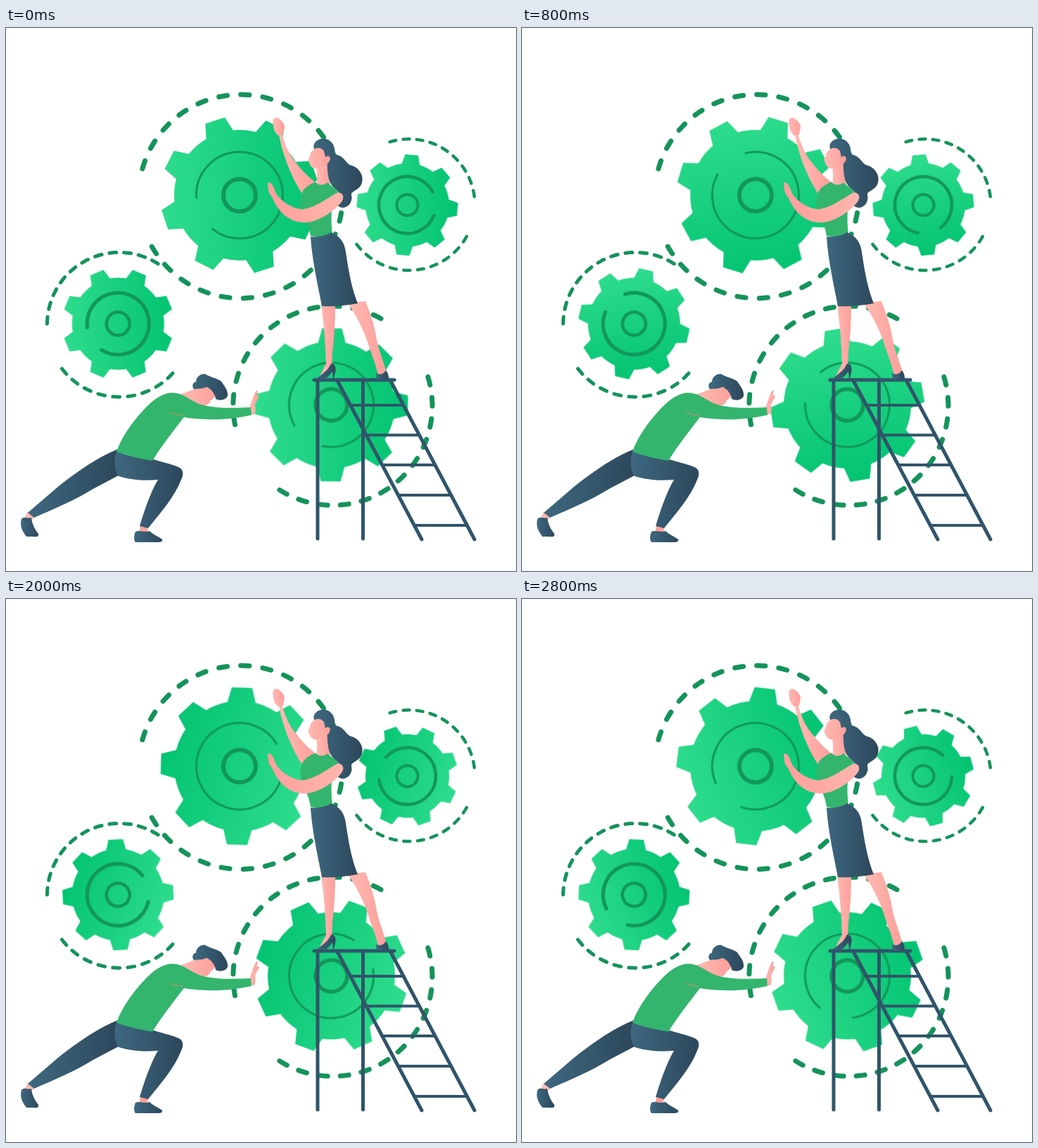
Recreate the animation shown at these times as an HTML page without scripts. Size 725 by 773 pixels, loop 3 s.

```html
<!DOCTYPE html>
<html lang="en">
<head>
<meta charset="utf-8">
<title>Turning gears</title>
<style>
html, body { margin: 0; width: 100%; height: 100%; overflow: hidden; background: #fff; }
svg { display: block; width: 100%; height: 100%; }

/* 20 degrees per tick, with one longer jump near the end */
.spin { animation: spin 3s infinite; }
@keyframes spin {
  0% { transform: rotate(0deg); animation-timing-function: steps(13); }
  86.666% { transform: rotate(260deg); animation-timing-function: step-end; }
  86.667% { transform: rotate(320deg); animation-timing-function: steps(2); }
  100% { transform: rotate(360deg); }
}

/* --a: tooth phase, --s: size */
.cog { transform: rotate(var(--a)) scale(var(--s)); clip-path: url(#cog); }
.cog circle { transform: rotate(calc(-1 * var(--a))); fill: url(#mint); }
.ring { fill: none; stroke: #12965a; stroke-linecap: round; }
.dash { fill: none; stroke: #14935a; stroke-linecap: round; }
.skin { fill: url(#skin); }
.shirt { fill: #33b56d; }
.navy { fill: url(#navy); }
.ladder { fill: none; stroke: #30546a; stroke-width: 5; stroke-linecap: round; }
</style>
</head>
<body>
<svg viewBox="0 0 725 773">
  <defs>
    <linearGradient id="mint" gradientUnits="userSpaceOnUse" x1="-115" y1="0" x2="115" y2="0">
      <stop offset="0" stop-color="#2ddc8c"/>
      <stop offset="1" stop-color="#04c472"/>
    </linearGradient>
    <linearGradient id="skin">
      <stop offset="0" stop-color="#ffbab2"/>
      <stop offset="1" stop-color="#fc9f9b"/>
    </linearGradient>
    <linearGradient id="forearm">
      <stop offset="0" stop-color="#fc9f9b"/>
      <stop offset="1" stop-color="#ffb5ae"/>
    </linearGradient>
    <linearGradient id="navy">
      <stop offset="0" stop-color="#3d687f"/>
      <stop offset="1" stop-color="#2d475b"/>
    </linearGradient>
    <path id="tooth" d="M-22-96L-15.6-120.2H15.6L22-96Z"/>
    <clipPath id="cog">
      <circle r="100"/>
      <use href="#tooth"/>
      <use href="#tooth" transform="rotate(45)"/>
      <use href="#tooth" transform="rotate(90)"/>
      <use href="#tooth" transform="rotate(135)"/>
      <use href="#tooth" transform="rotate(180)"/>
      <use href="#tooth" transform="rotate(225)"/>
      <use href="#tooth" transform="rotate(270)"/>
      <use href="#tooth" transform="rotate(315)"/>
    </clipPath>
  </defs>

  <!-- dashed orbits, measured in degrees -->
  <g class="dash" stroke-width="7" stroke-dasharray="4.8 7.6">
    <path pathLength="314.8" d="M193.9 200.5A145 145 0 1 1 207.3 311.1"/>
    <path pathLength="129.5" stroke-dasharray="4.9 7.56" d="M325.5 564.5A141.5 141.5 0 0 1 533 413.7"/>
    <path pathLength="139.3" stroke-dasharray="4.9 7.32" d="M599.8 496.6A141.5 141.5 0 0 1 388.9 657.6"/>
  </g>
  <g class="dash" stroke-width="5" stroke-dasharray="5.6 6.2">
    <path pathLength="123.6" d="M58.5 421A102.5 102.5 0 0 1 216.2 335.6"/>
    <path pathLength="101.4" stroke-dasharray="5.6 6.375" d="M237 491.5A102.5 102.5 0 0 1 79.5 485"/>
  </g>
  <g class="dash" stroke-width="4.5" stroke-dasharray="5.5 6.3">
    <path pathLength="100" d="M545.7 162.1A93.5 93.5 0 0 1 665.8 240.1"/>
    <path pathLength="113.9" stroke-dasharray="5.5 6.54" d="M654.8 296.8A93.5 93.5 0 0 1 498.4 307.9"/>
  </g>

  <g transform="translate(332 238)"><g class="spin">
    <g class="cog" style="--a:26.8deg;--s:.93"><circle r="130"/></g>
    <circle class="ring" r="23" stroke-width="6"/>
    <circle class="ring" r="61.5" stroke-width="3" pathLength="360" stroke-dasharray="312 48" transform="rotate(177)"/>
  </g></g>
  <g transform="translate(159.3 421)"><g class="spin">
    <g class="cog" style="--a:22.5deg;--s:.655"><circle r="130"/></g>
    <circle class="ring" r="16.5" stroke-width="4.5"/>
    <circle class="ring" r="44" stroke-width="5" pathLength="360" stroke-dasharray="309 51" transform="rotate(173)"/>
  </g></g>
  <g transform="translate(570.5 252)"><g class="spin">
    <g class="cog" style="--a:5deg;--s:.596"><circle r="130"/></g>
    <circle class="ring" r="15" stroke-width="4"/>
    <circle class="ring" r="40.5" stroke-width="4.5" pathLength="360" stroke-dasharray="312 48" transform="rotate(21)"/>
  </g></g>
  <g transform="translate(462.5 536.5)"><g class="spin">
    <g class="cog" style="--a:.5deg;--s:.905"><circle r="130"/></g>
    <circle class="ring" r="22.5" stroke-width="5.5"/>
    <circle class="ring" r="60" stroke-width="3" pathLength="360" stroke-dasharray="311 49" transform="rotate(151)"/>
  </g></g>

  <g class="ladder">
    <path d="M443 501V727M507.5 501V727M470.5 501L591 728M546 501L666 728"/>
    <path stroke-width="4" d="M490 537H564M512 579.5H586M536 622H609M558 665H631M581 708H655"/>
    <path d="M438 501H552"/>
  </g>

  <!-- woman -->
  <g>
    <path class="skin" d="M448 393H468C468 420 466 446 464 462L463 484L453 494L446 495L455 478C454 450 452 422 448 393Z"/>
    <path class="skin" d="M485 391L511 389C517 404 523 421 526 438C529 458 537 474 541 491L529 494C525 476 519 464 515 450C509 432 499 410 485 391Z"/>
    <path class="navy" d="M442 499C449 492 457 489 462 478C467 477 470 483 468 490L466 499H465L464 489C460 494 457 499 450 499Z"/>
    <path class="navy" d="M526 491C531 495 538 492 540 487C543 491 545 496 543 500H527Z"/>
    <path class="skin" d="M392 150C397 167 403 181 411 190C419 201 430 212 440 220L424 240C412 224 395 190 388 152Z"/>
    <path class="skin" d="M380 139C378 132 380 127 386 128C391 131 396 136 396 141L394 152L387 153C382 149 380 144 380 139Z"/>
    <path class="navy" d="M438 172C435 162 446 156 455 158C464 160 469 170 467 180C480 181 483 192 489 195C502 198 509 210 506 220C503 232 490 231 491 238C494 250 482 260 473 254C467 249 476 241 472 232C459 224 453 205 455 190Z"/>
    <path class="skin" d="M441 196L457 186C456 201 458 214 461 222C454 229 443 228 441 222C443 214 442 206 441 196Z"/>
    <path class="skin" d="M433 178C437 170 447 168 452 175L454 184C458 180 463 184 460 189C458 194 454 194 452 194C448 199 442 202 436 199C431 196 431 190 429 187C432 184 432 181 433 178Z"/>
    <path class="shirt" d="M421 234C425 226 433 222 440 219C444 225 452 224 457 220L473 233C469 240 465 248 463 260C462 272 463 284 464 293C454 299 442 298 433 296C431 278 420 264 418 249Z"/>
    <path class="navy" d="M433 297C443 298 454 296 462 291C474 296 481 304 483 319C487 345 491 370 500 392C484 395 465 397 449 396C443 364 435 330 433 297Z"/>
    <path fill="url(#forearm)" d="M372 221C374 218 379 222 381 228L384 236C393 248 405 256 420 258C439 257 456 242 472 234C482 235 481 245 474 251C460 266 442 276 425 277C402 277 387 262 378 240C373 236 373 230 372 221Z"/>
  </g>

  <!-- man -->
  <g>
    <path class="skin" d="M31 688L42 695L36 701L27 697ZM192 705L203 709L200 719H189Z"/>
    <path class="navy" d="M22 699C26 694 31 699 36 697C37 707 42 715 46 720C47 724 43 725 38 724H29C24 717 19 710 22 699Z"/>
    <path class="navy" d="M184 717C190 714 196 719 204 716C209 721 217 724 222 728C223 731 220 732 216 732H184C181 728 182 722 184 717Z"/>
    <path class="navy" d="M158 600C128 612 98 634 74 653L31 690L40 697C70 684 100 671 124 656L160 637Z"/>
    <path class="navy" d="M158 601L206 613C218 617 240 622 247 626C253 630 252 637 249 643C240 667 220 690 202 712L190 709C197 686 205 662 216 643C197 645 176 643 160 638C153 629 153 612 158 601Z"/>
    <path class="skin" d="M246 522C257 518 268 515 276 509L297 514C300 519 297 527 291 530C289 536 284 539 278 537L264 535Z"/>
    <path class="navy" d="M267 514C263 509 267 503 270 504C270 496 278 491 284 493C288 496 301 499 306 503C310 510 316 515 315 524C312 530 304 531 298 528C297 520 292 514 285 511C279 514 274 513 267 514Z"/>
    <path class="skin" d="M346 541C349 533 352 521 356 516C359 514 357 521 356 524C359 521 361 524 358 528L354 536C355 542 355 546 353 550H347Z"/>
    <path class="shirt" d="M157 603C166 578 184 555 202 537C216 524 229 517 243 520C257 523 265 533 280 537C302 542 325 541 348 540L349 551C322 557 291 560 253 554C239 572 222 594 208 616C190 613 172 609 157 603Z"/>
    <path d="M233 547Q241 551 251 551" fill="none" stroke="#d08a68" stroke-width="1.3"/>
  </g>
</svg>
</body>
</html>
```
